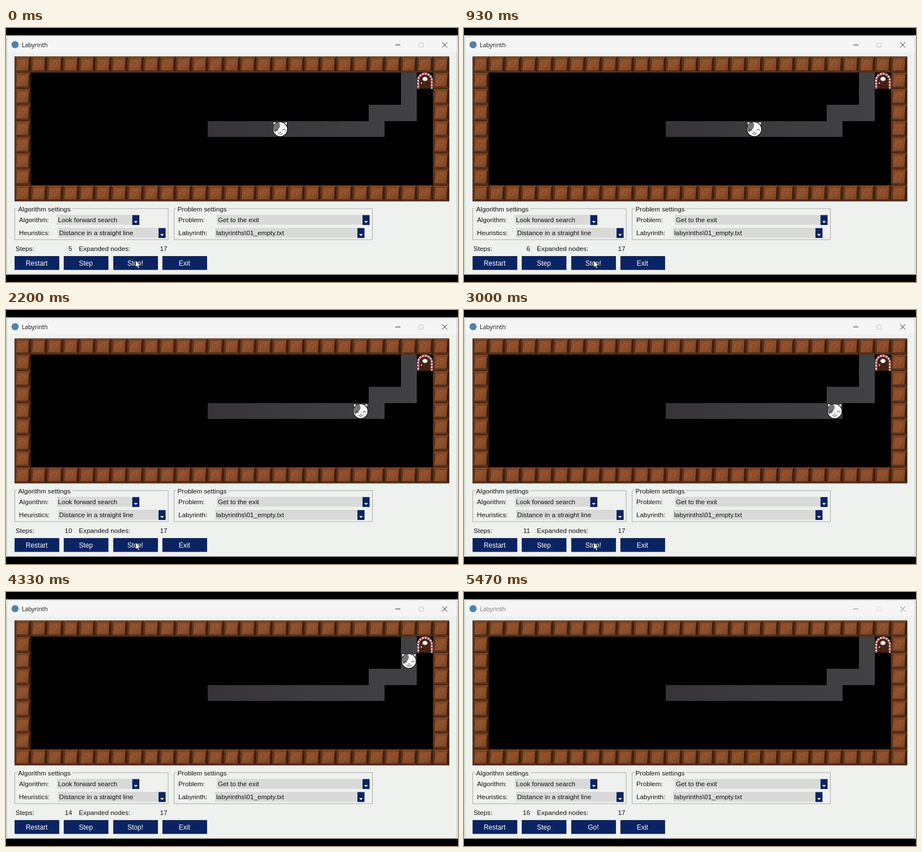
An HTML page for the animation above (5540 ms loop, 800 by 450 pixels).

```html
<!DOCTYPE html>
<html lang="en">
<head>
<meta charset="utf-8">
<title>Labyrinth</title>
<style>
  html, body { margin: 0; width: 100%; height: 100%; overflow: hidden; background: #000; }
  svg { display: block; width: 100vw; height: 100vh; }
  text { font: 11.7px "Liberation Sans", Arial, sans-serif; fill: #111; }
  .button text { font-size: 12px; fill: #fff; text-anchor: middle; }
  .number { text-anchor: end; }
  #caption text { font: 10.4px "Open Sans", sans-serif; }
</style>
</head>
<body>
<svg viewBox="0 0 800 450" preserveAspectRatio="none">
  <defs>
    <linearGradient id="cocoa" x1="0" y1="0" x2="1" y2="1">
      <stop offset="0" stop-color="#8a4e2b"/>
      <stop offset=".5" stop-color="#8d4f2a"/>
      <stop offset="1" stop-color="#7d4323"/>
    </linearGradient>
    <linearGradient id="trailTone" gradientUnits="userSpaceOnUse" x1="357" y1="0" x2="727" y2="0">
      <stop offset="0" stop-color="#363437"/>
      <stop offset="1" stop-color="#424244"/>
    </linearGradient>
    <g id="block">
      <path fill="#4a2815" d="M0 0H28.5V28.5H0z"/>
      <path fill="#7b4526" d="M0 .5H28.5L25 4H4z"/>
      <path fill="#5f331b" d="M0 .5L4 4 3 24 0 28z"/>
      <path fill="#3a1e0f" d="M28.500 .5V28L24 24 25 4z"/>
      <path fill="#57301a" d="M0 28L3 24H24L28.500 28z"/>
      <path fill="url(#cocoa)" d="M4 4H25L24 24.500H3z"/>
      <path fill="none" stroke="#a3663d" stroke-width=".9" d="M8 17Q8 8 15 8T14 18"/>
    </g>
    <g id="door">
      <path fill="#090606" d="M0 0H28.5V28.5H0z"/>
      <path fill="#4a2316" d="M4 28.5V13a10.2 10.2 0 0 1 20.5 0V28.5z"/>
      <path fill="none" stroke="#33170e" d="M10 16V28M18 16V28"/>
      <path fill="none" stroke="#e9dcdc" stroke-width="3.4" d="M2.200 28.5V13a12 11.200 0 0 1 24.100 0V28.5"/>
      <path fill="none" stroke="#bd3a48" stroke-width="3.4" stroke-dasharray="2.5 2.7"
        d="M2.200 28.5V13a12 11.200 0 0 1 24.100 0V28.5"/>
      <ellipse cx="14.3" cy="11.2" rx="4.6" ry="3.7" fill="#d5e6e8"/>
      <path fill="#fff" d="M11 10l4-2 2 3-4 2z"/>
      <circle cx="8" cy="18.5" r="1.3" fill="#e4d1cb"/>
    </g>
  </defs>

  <path fill="#dcebdc" d="M0 13H800V437H0z"/>
  <rect x="1.5" y="14.5" width="796.5" height="421.5" rx="5" fill="#eff1ef" stroke="#c5cbc6"/>
  <path fill="#f4f5f4" d="M2 43V20Q2 15 7 15H792Q797.500 15 797.500 20V43z"/>
  <circle cx="16" cy="29.500" r="6.300" fill="#5282a8"/>
  <g id="caption">
    <text x="28" y="33.500">Labyrinth</text>
    <path fill="none" stroke="#222" d="M689 30H698M772 25.500L781 34.500M781 25.500L772 34.500"/>
    <rect x="731" y="26.500" width="7.500" height="7.500" rx="1" fill="none" stroke="#c3c5c3"/>
  </g>

  <g id="board"></g>
  <use id="door-tile" href="#door"/>
  <g id="cat" stroke="#151515" stroke-linecap="round" stroke-linejoin="round">
    <path fill="#f0f0f0" d="M2.500 10L1.500 1.500Q7 2 10 4zM26 10L27 1.500Q21 2 18 4z"/>
    <circle cx="14.250" cy="14.800" r="12.900" fill="#f8f8f8" stroke-width="1.200"/>
    <path fill="#747474" stroke="none" d="M2.200 14Q3 5 12 2.500Q16 8 12.500 13T5 20Q2.200 18 2.200 14z"/>
    <g fill="none" stroke-width=".9">
      <path d="M5 17Q7.500 14 10.500 17M18.500 16.500Q21.500 13.500 24 16.500"/>
      <path d="M10.500 21.500Q14.500 26 18.500 21.500M13.500 20H15.500"/>
    </g>
  </g>

  <g id="form"></g>
  <text x="17" y="395">Steps:</text>
  <text id="steps" class="number" x="117" y="395"></text>
  <text x="129" y="395">Expanded nodes:</text>
  <text class="number" x="285.500" y="395">17</text>
  <path id="pointer" fill="#fff" stroke="#222" stroke-width=".8"
    d="M229.500 411.500V424L232.300 421.400 234.300 426 236.300 425.200 234.300 420.800H238z"/>
</svg>

<script>
  const LOOP = 5540, COLS = 27, ROWS = 9;
  const CELL_W = 28.48, CELL_H = 28.5, LEFT = 15.3, TOP = 50.6;
  const byId = id => document.getElementById(id);
  const place = (col, row) => `translate(${LEFT + col * CELL_W} ${TOP + row * CELL_H})`;
  const rect = (x, y, w, h, extra) => `<rect x="${x}" y="${y}" width="${w}" height="${h}" ${extra}/>`;
  const label = (x, y, words, extra = '') => `<text x="${x}" y="${y}" ${extra}>${words}</text>`;

  // The route: right along row 4, then up in two flights to the door.
  const route = [[12, 4]];
  for (const [dx, dy, count] of [[1, 0, 10], [0, -1, 1], [1, 0, 2], [0, -1, 2], [1, 0, 1]]) {
    for (let i = 0; i < count; i++) {
      const [col, row] = route[route.length - 1];
      route.push([col + dx, row + dy]);
    }
  }
  const goal = route.length - 1;

  function drawBoard() {
    let out = rect(LEFT, TOP, COLS * CELL_W, ROWS * CELL_H, 'fill="#000"');
    for (const [col, row] of route.slice(0, goal)) {
      out += rect(LEFT + col * CELL_W, TOP + row * CELL_H, CELL_W, CELL_H,
        'fill="url(#trailTone)" shape-rendering="crispEdges"');
    }
    for (let row = 0; row < ROWS; row++) {
      for (let col = 0; col < COLS; col++) {
        const edge = row % (ROWS - 1) === 0 || col % (COLS - 1) === 0;
        if (edge) out += `<use href="#block" transform="${place(col, row)}"/>`;
      }
    }
    byId('board').innerHTML = out;
    byId('door-tile').setAttribute('transform', place(...route[goal]));
  }

  function group(x, width, title, titleWidth) {
    return rect(x, 320, width, 55, 'fill="none" stroke="#a9aba9"') +
      rect(x + 4, 316, titleWidth, 9, 'fill="#eff1ef"') + label(x + 6, 324.5, title);
  }

  function combo(x, y, width, words, size) {
    const right = x + width;
    return rect(x, y, width, 17.5, 'fill="#d8d9d8"') +
      rect(right - 12.5, y + 0.5, 12.5, 17.5, 'fill="#0b2362"') +
      `<path fill="#fff" d="M${right - 9.5} ${y + 11}h6.500l-3.200 3.500z"/>` +
      label(x + 2, y + 13, words, `style="font-size:${size}px"`);
  }

  function button(x, words, id = '') {
    return `<g class="button">${rect(x + 0.8, 404.7, 78, 23.3, 'fill="#0a2463" stroke="#051540"')}` +
      label(x + 39.3, 421, words, id && `id="${id}"`) + '</g>';
  }

  function drawForm() {
    byId('form').innerHTML =
      group(15.5, 271.5, 'Algorithm settings', 98) + group(297.5, 351, 'Problem settings', 91) +
      label(23, 344, 'Algorithm:') + label(23, 367, 'Heuristics:') +
      label(305, 344, 'Problem:') + label(305, 367, 'Labyrinth:') +
      combo(90, 331, 146, 'Look forward search', 11.6) +
      combo(92, 354, 190.5, 'Distance in a straight line', 11.75) +
      combo(373, 331, 270.5, 'Get to the exit', 11.7) +
      combo(370, 354, 264.5, 'labyrinths\\01_empty.txt', 11.75) +
      button(15, 'Restart') + button(102, 'Step') + button(189.5, 'Stop!', 'run') + button(276.5, 'Exit');
  }

  function render(t) {
    const moves = Math.min(goal, Math.max(4, 5 + Math.floor((t - 545) / 410)));
    const arrived = moves === goal;
    byId('cat').setAttribute('transform', place(...route[moves]));
    byId('cat').style.display = arrived ? 'none' : '';
    // The counter leads the cat by one until it reaches 11.
    byId('steps').textContent = Math.max(moves, Math.min(moves + 1, 11));
    byId('run').textContent = arrived ? 'Go!' : 'Stop!';
    byId('pointer').style.display = t < 3450 ? '' : 'none';
    byId('caption').style.opacity = t < 5400 ? 1 : t < 5470 ? 0.75 : 0.55;
  }

  drawBoard();
  drawForm();
  const start = performance.now();
  function tick() {
    render((performance.now() - start) % LOOP);
    requestAnimationFrame(tick);
  }
  tick();
</script>
</body>
</html>
```
